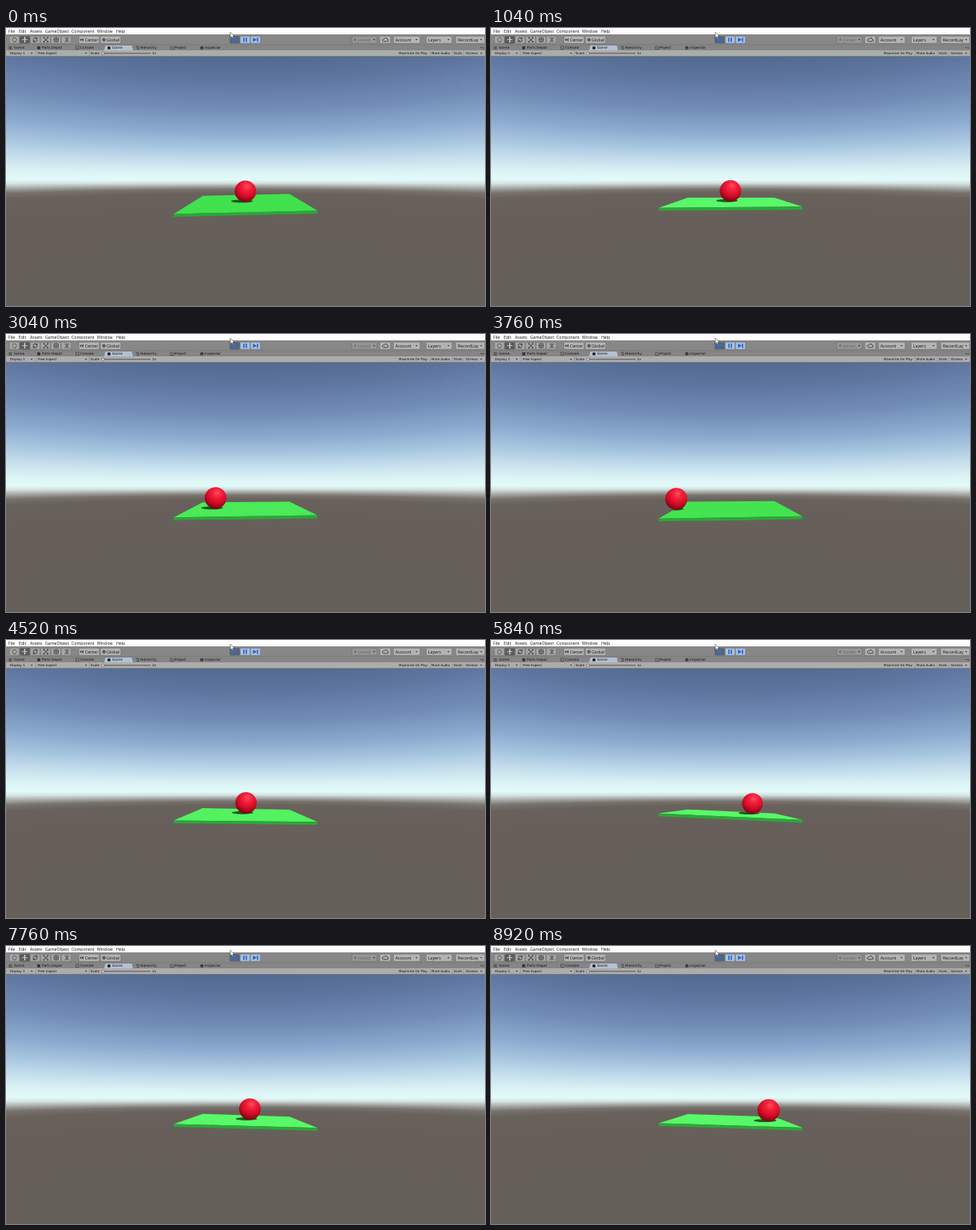
Recreate the animation shown at these times as an HTML page with a canvas. Size 600 by 349 pixels, loop 8960 ms.

```html
<!DOCTYPE html>
<html lang="en">
<head>
<meta charset="utf-8">
<title>Ball on a tilting board</title>
<style>
  html, body { margin: 0; width: 100%; height: 100%; overflow: hidden; background: #67605a; }
  canvas, svg { position: absolute; left: 0; top: 0; width: 600px; height: 349px; display: block; }
  .menu { font: 5.2px "Open Sans", "Noto Sans", sans-serif; fill: #111; }
  .tool { font: 5.3px "Open Sans", "Noto Sans", sans-serif; fill: #111; }
  .tab { font: 4.3px "DejaVu Sans", sans-serif; fill: #111; }
  .bar { font: 4.05px "DejaVu Sans", sans-serif; fill: #111; }
  .off { fill: #666; }
</style>
</head>
<body>
<canvas id="sky" width="600" height="349"></canvas>
<svg id="stage" viewBox="0 0 600 349" xmlns="http://www.w3.org/2000/svg">
  <defs>
    <radialGradient id="red" cx=".57" cy=".27" r=".8">
      <stop offset="0" stop-color="#ff4a5e"/>
      <stop offset=".28" stop-color="#f31f3a"/>
      <stop offset=".6" stop-color="#d20b25"/>
      <stop offset="1" stop-color="#62000d"/>
    </radialGradient>
    <clipPath id="board"><polygon id="edge"/></clipPath>
  </defs>
  <g id="scene">
    <polygon id="top"/>
    <g clip-path="url(#board)"><ellipse id="shadow" ry="1.9" fill="#1b5a22"/></g>
    <polygon id="front" fill="#2aa838"/>
    <circle id="ball" fill="url(#red)"/>
  </g>
  <g id="ui"></g>
</svg>
<script>
const LOOP = 8960, STEP = 40;
const $ = id => document.getElementById(id);
const ui = $('ui');

// --- Backdrop: colour bands around the horizon, bending away from it at the sides ---
const HORIZON = 192.5, REACH = 300;
const SKY = [
  [-157, '#52698f'], [-132, '#5c739c'], [-92, '#708cb5'], [-62, '#8caacf'],
  [-42, '#a8c6e0'], [-26, '#c4deec'], [-11, '#dcf3f5'], [-2, '#e3faf9'],
  [2, '#d3e2e1'], [6, '#a5a8a5'], [10, '#78726d'], [15, '#69625c'], [30, '#67605a'], [157, '#66605a']
];

function paintSky() {
  const g = $('sky').getContext('2d');
  for (let x = 0; x < 600; x++) {
    const side = ((x - 300) / 300) ** 2;
    const fill = g.createLinearGradient(0, HORIZON - REACH, 0, HORIZON + REACH);
    for (const [d, c] of SKY) {
      const y = d * (1 + side * (d < 0 ? .25 : .5));
      fill.addColorStop((y + REACH) / (2 * REACH), c);
    }
    g.fillStyle = fill;
    g.fillRect(x, 35, 1, 314);
  }
}

// --- Editor chrome ---
function add(tag, attrs, text) {
  const el = document.createElementNS('http://www.w3.org/2000/svg', tag);
  for (const k in attrs) el.setAttribute(k, attrs[k]);
  if (text) el.textContent = text;
  return ui.appendChild(el);
}
const rect = (x, y, width, height, fill, rx = 0) => add('rect', { x, y, width, height, fill, rx });
const path = (d, stroke = '#222', fill = 'none', w = .8) => add('path', { d, stroke, fill, 'stroke-width': w });
const label = (cls, x, y, text) => add('text', { class: cls, x, y }, text);
const arrow = (x, y) => path(`M${x} ${y}h2.4l-1.2 1.6z`, 'none', '#222');

function button(x, w, fill = '#b4b4b4') {
  add('rect', { x: x + .25, y: 10.25, width: w - .5, height: 9, rx: 1.2, fill, stroke: '#666', 'stroke-width': .5 });
}

function menuBar() {
  rect(0, 0, 600, 8, '#fdfdfd');
  [[3, 'File'], [16, 'Edit'], [30, 'Assets'], [49, 'GameObject'], [82, 'Component'], [114, 'Window'], [138, 'Help']]
    .forEach(([x, s]) => label('menu', x, 6, s));
}

function toolBar() {
  rect(0, 8, 600, 13, '#878787');
  for (let i = 0; i < 6; i++) button(4 + i * 13, 13, i === 1 ? '#5a5a5a' : '#a6a6a6');
  path('M8.2 14.5l1-2h3l1 2-1.2 3h-2.6z', '#333', 'none', .6);
  path('M23.5 11.5v6.5M20.3 14.7h6.5M22.5 12.5l1-1 1 1M22.5 17l1 1 1-1', '#eee');
  path('M34 14.5a2.6 2.6 0 0 1 4.7-1.2M39.2 15a2.6 2.6 0 0 1-4.7 1.2M39 11.8v2h-2M34.2 17.8v-2h2');
  path('M47 13.2v-1.4h1.5M51.2 11.8h1.5v1.4M47 16.4v1.4h1.5M51.2 17.8h1.5v-1.4M47.5 12.3l5 5M52.5 12.3l-5 5');
  path('M60.3 12.2h5v5h-5z', '#222', 'none', .6);
  path('M62.8 11.5v6.5M59.6 14.7h6.5', '#222', 'none', .6);
  path('M73.5 12l5.5 5.5M79 12l-5.5 5.5M76.2 11.5v2M76.2 16v2', '#222', 'none', .7);

  button(91, 26);
  button(118, 26);
  path('M93 14.8h4M94.3 13.4l-1.4 1.4 1.4 1.4M96.5 13v3.6');
  label('tool', 98.8, 16.7, 'Center');
  add('circle', { cx: 122.7, cy: 14.8, r: 1.8, fill: 'none', stroke: '#222', 'stroke-width': .7 });
  path('M121 14.8h3.5M122.7 13v3.6', '#222', 'none', .5);
  label('tool', 126, 16.7, 'Global');

  button(280, 13, '#56657c');
  button(293, 13, '#a9c0df');
  button(306, 13, '#a9c0df');
  path('M284.5 12.2l5 2.6-5 2.6z', 'none', '#2b70dd');
  rect(297.2, 12.1, 1.6, 5.4, '#2466ce');
  rect(300.2, 12.1, 1.6, 5.4, '#2466ce');
  path('M309.4 12.1l4.8 2.7-4.8 2.7z', 'none', '#2466ce');
  rect(314.4, 12.1, 1.5, 5.4, '#2466ce');

  button(433, 32, '#979797');
  add('circle', { cx: 437.5, cy: 14.8, r: 1.7, fill: '#777' });
  label('tool off', 441, 16.7, 'Joined');
  arrow(460, 14);
  button(468, 14);
  path('M472.5 16.8h5a1.3 1.3 0 0 0 .2-2.6 2.1 2.1 0 0 0-4-.4 1.5 1.5 0 0 0-1.2 3z');
  button(485, 34);
  label('tool', 487.7, 16.7, 'Account');
  arrow(513, 14);
  button(526, 33);
  label('tool', 528.7, 16.7, 'Layers');
  arrow(553, 14);
  button(563, 37);
  label('tool', 566, 16.7, 'RecordLay');
  arrow(594, 14);
}

function tabs() {
  rect(0, 21, 600, 7, '#858585');
  rect(0, 20.7, 600, .5, '#6d6d6d');
  path('M123 28l1.5-6h33l1.5 6z', 'none', '#b4c0d3');
  [[10, 'Scene'], [45, 'Parts Depot'], [93, 'Console'], [133, 'Game'], [168, 'Hierarchy'], [211, 'Project'], [249, 'Inspector']]
    .forEach(([x, s]) => label('tab', x, 26.4, s));
  path('M3.5 23.7h4M3.5 25h4M3.5 26.3h4', '#222', 'none', .6);
  rect(39.2, 23, 3.6, 3.8, '#333');
  path('M87.5 23h3.7v3.6h-3.7z', '#333', 'none', .6);
  add('circle', { cx: 129, cy: 24.9, r: 2, fill: '#222' });
  path('M162.5 23.3h4M163.8 24.9h2.7M163.8 26.4h2.7', '#222', 'none', .6);
  path('M206 23.3h1.5l.6.7h1.9v2.7h-4z', '#333', 'none', .6);
  add('circle', { cx: 245.4, cy: 24.9, r: 2, fill: '#222' });
  rect(245.1, 24.5, .6, 1.7, '#ddd');
  path('M594 24h2.2l-1.1 1.5zM596.8 24h2v.5h-2zM596.8 25.3h2v.5h-2z', 'none', '#333');
}

function gameBar() {
  rect(0, 28, 600, 7.5, '#acacac');
  rect(0, 35, 600, .7, '#777');
  [[5, 'Display 1'], [40, 'Free Aspect'], [106, 'Scale'], [183, '1x'],
   [492, 'Maximize On Play'], [533, 'Mute Audio'], [561, 'Stats'], [576, 'Gizmos']]
    .forEach(([x, s]) => label('bar', x, 33.2, s));
  arrow(31, 31);
  arrow(99, 31);
  arrow(594, 31);
  [37, 104, 531, 559, 573.5].forEach(x => rect(x, 28.5, .5, 6.5, '#858585'));
  rect(120, 31.3, 61, 1, '#555');
  add('circle', { cx: 121.5, cy: 31.8, r: 1.6, fill: '#ddd', stroke: '#444', 'stroke-width': .5 });
}

function pointer() {
  path('M281 5.2v7.2l1.7-1.5 1.1 2.5 1.2-.5-1.1-2.4h2.2z', '#222', '#fff', .5);
}

// --- Motion: the ball rolls off the board with steady acceleration, then a new run begins ---
const REST = [300, 204.4, 13.4]; // ball x, y, radius
// board heights: front left, back left, back right, front right
const RUNS = [
  { from: -150, to: 960, ball: [298, 237.4, 18.3], tilt: [[233.3, 210.8, 208.3, 229.2], [234, 210.3, 207.8, 230]] },
  { from: 960, to: 4280, ball: [204.5, 208, 13.9], tilt: [[225.5, 213.1, 213.1, 224.2], [233, 210.1, 209, 229.6]] },
  { from: 4280, to: 7160, ball: [393.7, 207.1, 12], tilt: [[228, 210.7, 212.1, 228.7], [209.2, 214.4, 222.6, 223.3]] },
  { from: 7160, to: 8960, ball: [350, 206.4, 14], tilt: [[223.9, 210.7, 214.1, 228.4], [222.4, 211, 214.4, 228]] }
];

const lerp = (a, b, u) => a.map((v, i) => v + (b[i] - v) * u);

function set(id, attrs) {
  for (const k in attrs) $(id).setAttribute(k, attrs[k]);
}

function draw(t) {
  const run = RUNS.find(r => t < r.to);
  const u = (t - run.from) / (run.to - run.from);
  const [x, y, r] = lerp(REST, run.ball, u * u);
  const [fl, bl, br, fr] = lerp(...run.tilt, u);
  const lit = Math.max(0, Math.min(1, (24 - (fl - bl)) / 11));
  const [red, green, blue] = lerp([62, 222, 74], [88, 248, 104], lit).map(Math.round);
  const points = `210,${fl} 246.5,${bl} 355,${br} 390,${fr}`;
  set('top', { points, fill: `rgb(${red},${green},${blue})` });
  set('edge', { points });
  set('front', { points: `210,${fl} 390,${fr} 390,${fr + 3.8} 210,${fl + 3.5}` });
  set('shadow', { cx: x - .32 * r, cy: y + .92 * r, rx: r });
  set('ball', { cx: x, cy: y, r });
}

paintSky();
menuBar();
toolBar();
tabs();
gameBar();
pointer();

const start = performance.now();
function tick() {
  const t = (performance.now() - start) % LOOP;
  draw(Math.floor(t / STEP) * STEP);
  requestAnimationFrame(tick);
}
tick();
</script>
</body>
</html>
```
